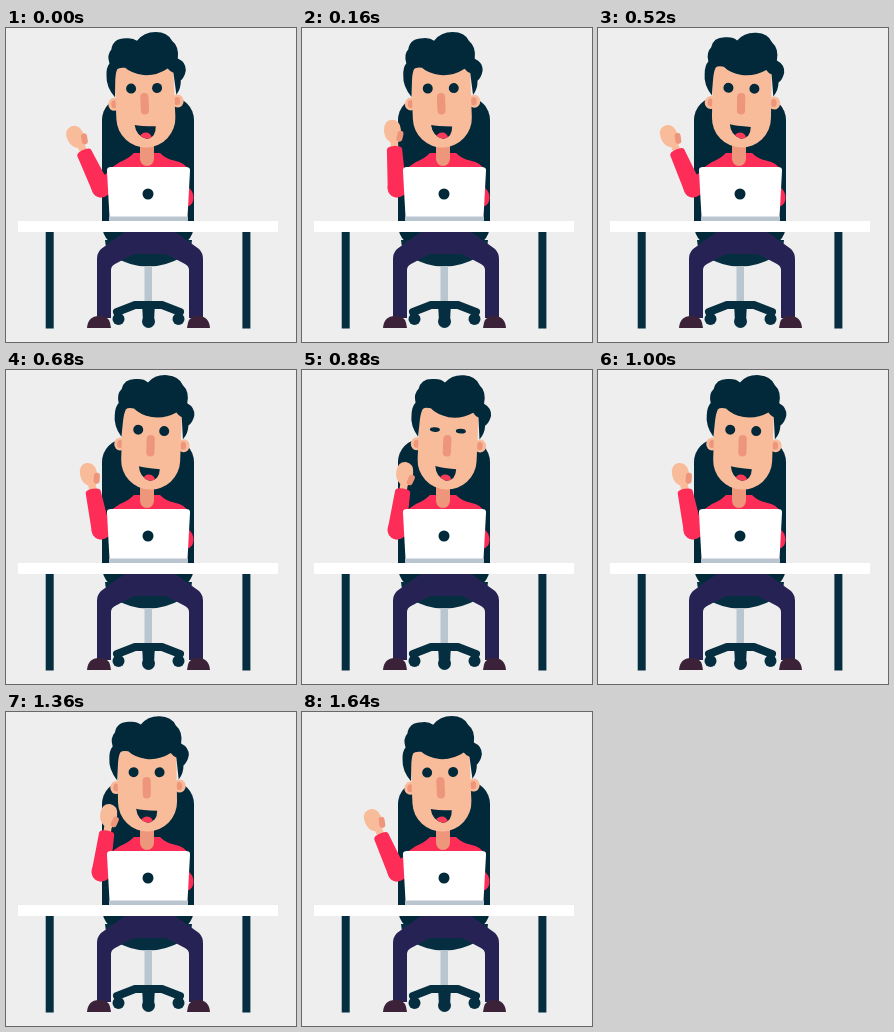
Recreate the animation shown at these times as an HTML page. Size 290 px wide and 314 px high, loop 1680 ms.

```html
<!DOCTYPE html>
<html lang="en">
<head>
<meta charset="utf-8">
<title>Waving at the desk</title>
<style>
  html, body { margin: 0; width: 100%; height: 100%; overflow: hidden; background: #eee; }
  svg { display: block; width: 290px; height: 314px; }
  .ink { fill: #02293a; }
  .slate { fill: #052f40; }
  .skin { fill: #f9bc9a; }
  .shade { fill: #ee967c; }
  .red { fill: #fd2d57; }
  .pants { fill: #262354; }
  .shoe { fill: #3b2238; }
  .steel { fill: #b9c6d0; }
  .white { fill: #fff; }
</style>
</head>
<body>
<svg viewBox="0 0 290 314">
  <defs>
    <clipPath id="lips">
      <path id="mouth" d="M131 96.500Q136 98 152 98.800Q152 104 149.500 107.500Q146 111 142 110.700Q132 107.500 131 96.500Z"/>
    </clipPath>
  </defs>
  <rect width="290" height="314" fill="#eee"/>

  <!-- chair -->
  <rect class="ink" x="96" y="69" width="92" height="151" rx="23"/>
  <path class="slate" d="M99 212H186Q186 222 176 229Q160 238.500 142 238.500Q124 238.500 109 229Q99 222 99 212Z"/>
  <rect class="steel" x="138.500" y="238" width="7.500" height="40"/>
  <path d="M111 284L129 277H156L174 284" fill="none" stroke="#052f40" stroke-width="8" stroke-linejoin="round" stroke-linecap="round"/>
  <path class="slate" d="M136 274H149L148 294H137Z"/>
  <g class="slate">
    <circle cx="112.500" cy="291" r="6"/>
    <circle cx="142.500" cy="293.500" r="6.500"/>
    <circle cx="172.500" cy="291" r="6"/>
  </g>

  <!-- legs -->
  <path class="pants" d="M120 203H168L193 221Q197 225 197 231V290H183V242Q183 238 179 236L160 226H128L109 236Q105 238 105 242V290H91V231Q91 225 95 221Z"/>
  <path class="shoe" d="M81 300Q82 288 93 288H97Q104 289 105 300Z"/>
  <path class="shoe" d="M204 300Q203 288 192 288H189Q182 289 181 300Z"/>

  <!-- body -->
  <path class="red" d="M103 142Q109 137 114 134Q122 131 128 125H154Q160 131 168 132.500Q180 135 182 142V159Q187.500 163 187.500 170Q187 178 180 179H108Z"/>
  <path d="M95 160L119 145" stroke="#fd2d57" stroke-width="19" stroke-linecap="round"/>
  <path class="shade" d="M134 110H148V131Q147 138 141 138Q135 138 134 131Z"/>

  <g id="arm">
    <path class="skin" d="M-3.500 -36V-46Q-9.500 -50 -9.300 -58Q-9 -68 -1 -68.500Q7.500 -68 7.700 -58Q7.500 -50 4 -45V-36Z"/>
    <rect class="shade" x="3.300" y="-57" width="6" height="11" rx="3" transform="rotate(16 6.300 -51.500)"/>
    <path class="red" d="M-7.600 -39Q-7 -42 0 -42Q7 -42 7.600 -39L9.300 0A9.300 9.300 0 0 1 -9.300 0Z"/>
  </g>

  <g id="head">
    <ellipse class="skin" cx="111.500" cy="75" rx="6" ry="6.500"/>
    <ellipse class="skin" cx="175" cy="74.500" rx="6" ry="6.500"/>
    <ellipse class="shade" cx="111.500" cy="75" rx="3" ry="4"/>
    <ellipse class="shade" cx="174.500" cy="74.500" rx="3" ry="4"/>
    <path class="skin" d="M113 36H172V90A29.500 29.500 0 0 1 113 90Z"/>
    <path class="ink" d="M112.500 68Q104 57 105 46Q105 38 108.500 34Q106 25 111 20Q113 9 126 9.500Q133 9 137 12.500Q144 4 156 4.500Q168 5 172 14Q179 20 177 32Q185 36 184.500 44Q183 51 179 54Q179 62 174 68L172 46Q169 45 166.500 41.500Q155 48.500 142 47Q130 45 124 39Q118 38 116 40Q114 44 113.500 52Z"/>
    <ellipse class="ink eye" cx="129" cy="60" rx="5" ry="5"/>
    <ellipse class="ink eye" cx="155" cy="60.500" rx="5" ry="5"/>
    <rect class="shade" x="137.800" y="65" width="8.200" height="21.500" rx="4.100"/>
    <use href="#mouth" class="ink"/>
    <ellipse cx="141.500" cy="110" rx="6" ry="5.500" fill="#fb3a5a" clip-path="url(#lips)"/>
  </g>

  <!-- laptop and table -->
  <path class="white" d="M105 139H180Q184.500 139 184 143L181.500 189H103.500L101 143Q100.500 139 105 139Z"/>
  <rect class="steel" x="103" y="188.500" width="79" height="5"/>
  <circle class="ink" cx="142" cy="166" r="5.500"/>
  <rect class="slate" x="39.700" y="203" width="8" height="97.500"/>
  <rect class="slate" x="236.400" y="203" width="8" height="97.500"/>
  <rect class="white" x="12" y="193" width="260" height="11"/>
</svg>
<script>
  const LOOP = 1680, STEP = 40, WAVE = LOOP / 3;
  const arm = document.getElementById('arm');
  const head = document.getElementById('head');
  const eyes = document.querySelectorAll('.eye');
  const swing = (t, period) => Math.cos(2 * Math.PI * t / period);

  // Eye openness: closes around the middle of the loop.
  function lid(t) {
    return Math.max(0.15, Math.min(1, Math.abs(t - 840) / 85));
  }

  function draw(now) {
    const t = Math.floor((now % LOOP) / STEP) * STEP;
    arm.setAttribute('transform', `translate(95 160) rotate(${-7.7 - 17.9 * swing(t, WAVE)})`);
    head.setAttribute('transform', `rotate(${-2.5 * swing(t, LOOP)} 141 150)`);
    eyes.forEach(eye => eye.setAttribute('ry', 5 * lid(t)));
  }

  const start = performance.now();
  function tick() {
    draw(performance.now() - start);
    requestAnimationFrame(tick);
  }
  tick();
</script>
</body>
</html>
```
